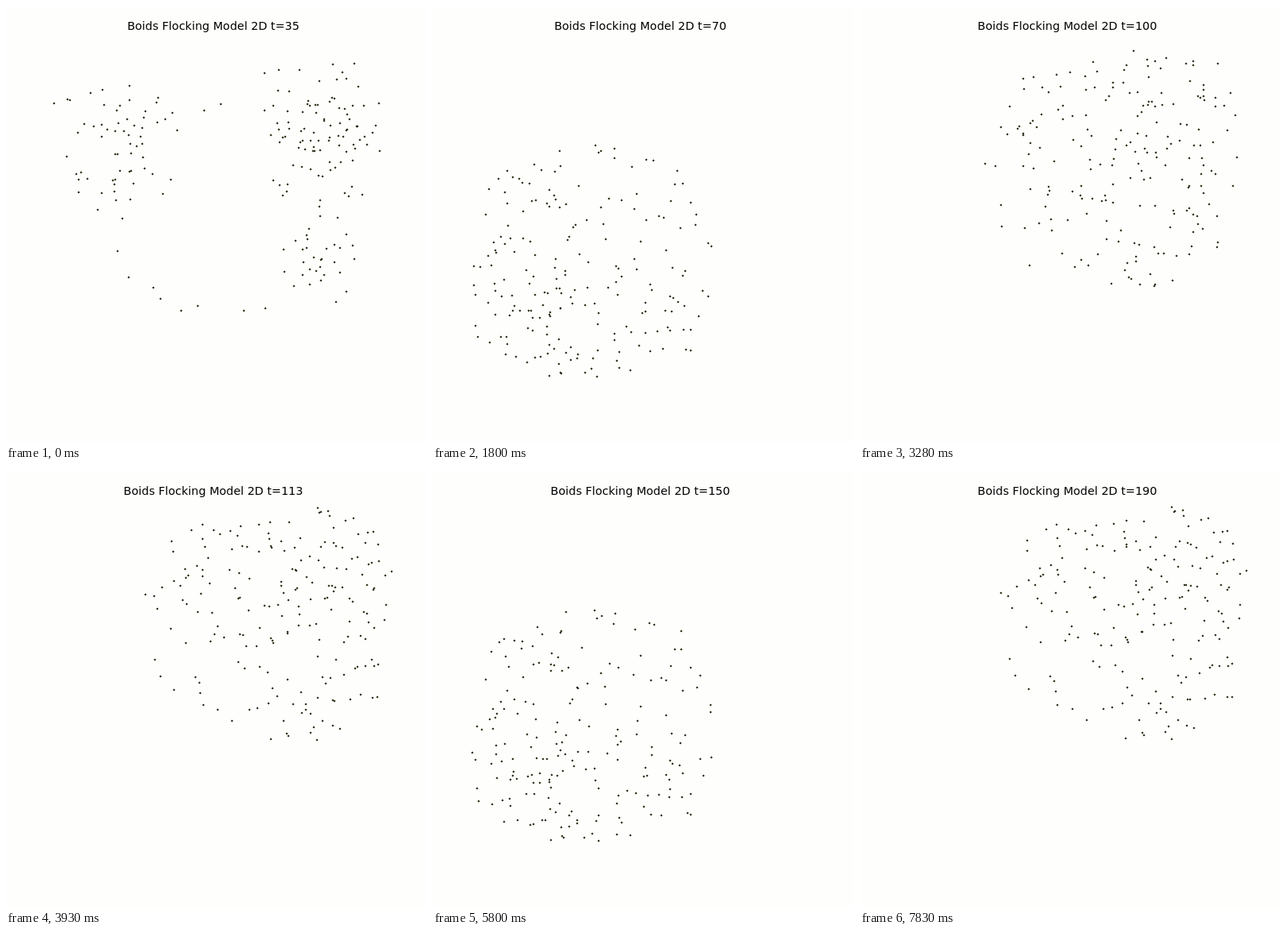
Write an HTML page with a canvas that moves like this. It is 530x550 px and loops after 7880 ms.

```html
<!DOCTYPE html>
<html lang="en">
<head>
<meta charset="utf-8">
<title>Boids</title>
<style>
  html, body { margin: 0; width: 530px; height: 550px; overflow: hidden; background: #fefefc; }
  canvas, svg { position: absolute; left: 0; top: 0; }
  text { font: 14.4px "DejaVu Sans", sans-serif; text-anchor: middle; }
</style>
</head>
<body>
<canvas id="stage" width="530" height="550"></canvas>
<svg width="530" height="550"><text id="label" x="261" y="30"></text></svg>
<script>
const LOOP = 7880, STEP = 50.3, LAST = 155;
const COUNT = 200, TAU = Math.PI * 2;
const SWING = 3900, PEAK = 3720, GATHER = 1000;

const ctx = document.getElementById('stage').getContext('2d');
const label = document.getElementById('label');

let seed = 11;
function random() {
  seed = (seed + 0x6d2b79f5) | 0;
  let n = Math.imul(seed ^ (seed >>> 15), 1 | seed);
  n = (n + Math.imul(n ^ (n >>> 7), 61 | n)) ^ n;
  return ((n ^ (n >>> 14)) >>> 0) / 4294967296;
}
const spread = () => random() + random() - 1;

// Opening clusters: lower right, upper left, upper right
const column = { x: 395, y: 310, w: 66, h: 88 };
const left = { x: 140, y: 178, w: 84, h: 94 };
const right = { x: 400, y: 156, w: 88, h: 92 };

function makeBoid(i) {
  const turn = i / COUNT;
  const angle = TAU * (turn + random() / COUNT) - .2;
  const hub = turn < .18 ? column : turn < .5 ? left : right;
  const onRing = i % 8 === 0;
  return {
    // Every eighth boid starts on a loose ring that links the clusters
    x: onRing ? 262 + 132 * Math.cos(angle) + 24 * spread() : hub.x + hub.w * spread(),
    y: onRing ? 258 + 134 * Math.sin(angle) + 24 * spread() : hub.y + hub.h * spread(),
    angle,
    radius: random() ** .52 * (1 + .1 * Math.sin(2 * angle) ** 2),
    lag: .35 * spread()
  };
}
const boids = Array.from({ length: COUNT }, (_, i) => makeBoid(i));

// The flock swings between upper right (c = 1) and lower left (c = -1),
// and its densest part leans towards the corner it approaches
function flockPoint({ angle, radius, lag }, ms) {
  const c = Math.cos(TAU * (ms - PEAK) / SWING + lag);
  const u = radius * Math.cos(angle), v = radius * Math.sin(angle);
  return [
    268 + 68 * c + 152 * u + 34 * c * (1 - Math.abs(u)),
    256 - 65 * c + 148 * v - 34 * c * (1 - Math.abs(v))
  ];
}

function draw(step) {
  const ms = step * STEP;
  const s = Math.min(ms / GATHER, 1);
  const gather = s * s * (3 - 2 * s);
  ctx.clearRect(0, 0, 530, 550);
  for (const boid of boids) {
    const [fx, fy] = flockPoint(boid, ms);
    const x = Math.round(boid.x + (fx - boid.x) * gather);
    const y = Math.round(boid.y + (fy - boid.y) * gather);
    ctx.fillStyle = 'rgba(50, 50, 0, .12)';
    ctx.fillRect(x - 1, y - 1, 3, 3);
    ctx.fillStyle = 'rgba(30, 30, 0, .68)';
    ctx.fillRect(x - 1, y, 3, 1);
    ctx.fillRect(x, y - 1, 1, 3);
    ctx.fillStyle = '#000';
    ctx.fillRect(x, y, 1, 1);
  }
  label.textContent = `Boids Flocking Model 2D t=${35 + step}`;
}

const start = performance.now();
let shown = -1;
function tick() {
  const ms = (performance.now() - start) % LOOP;
  const step = Math.min(Math.floor(ms / STEP), LAST);
  if (step !== shown) draw(shown = step);
  requestAnimationFrame(tick);
}
tick();
</script>
</body>
</html>
```
